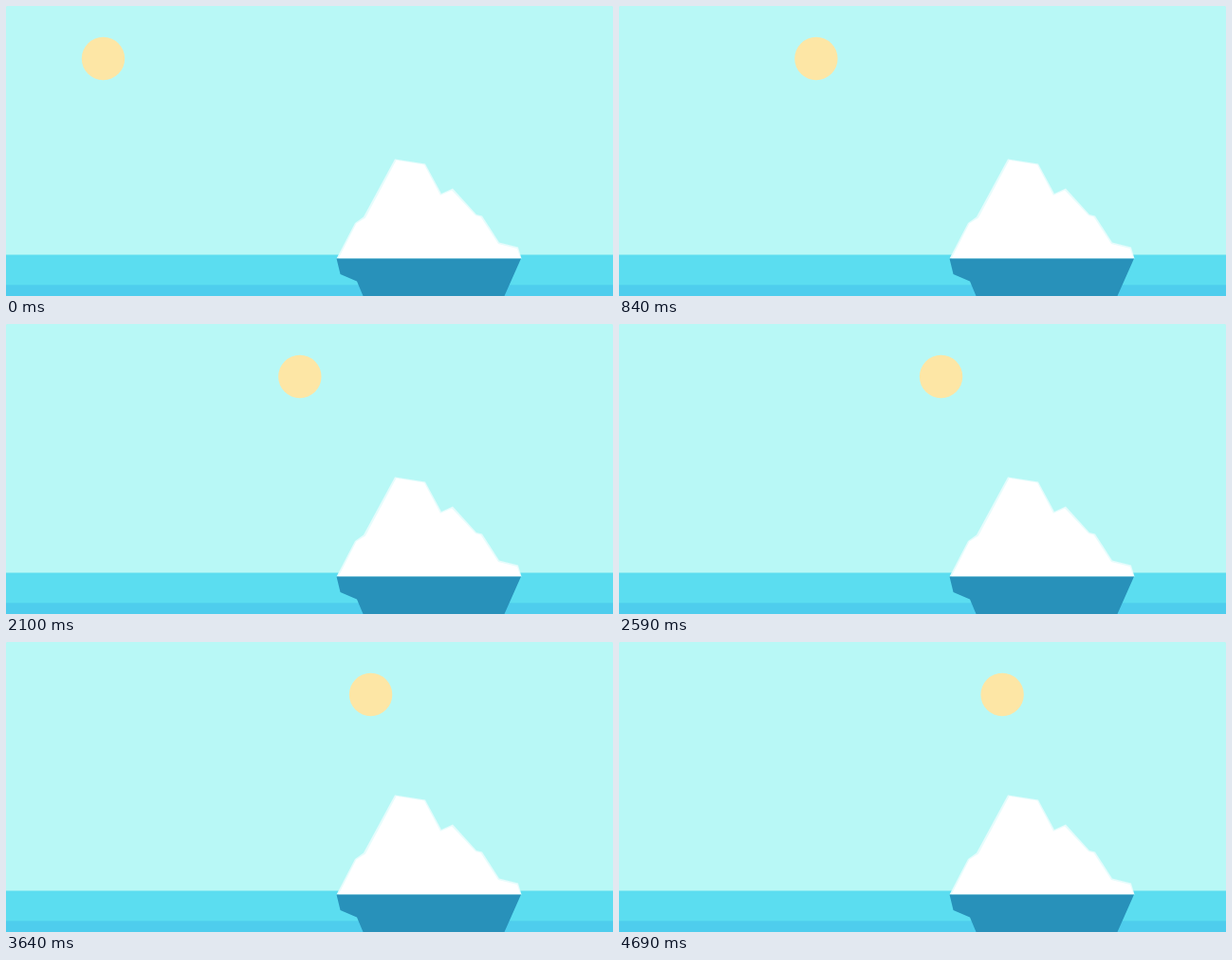
An HTML page that plays this animation: 640 by 306 pixels, repeating every 4.83 s.

```html
<!DOCTYPE html>
<html lang="en">
<head>
<meta charset="utf-8">
<title>Iceberg</title>
<style>
  html, body { margin: 0; width: 100%; height: 100%; overflow: hidden; background: #d5eeee; }
  svg { display: block; width: 100%; height: 100%; border-radius: 2px 2px 0 0; }
</style>
</head>
<body>
<svg viewBox="0 0 640 306">
  <rect width="640" height="306" fill="#b8f8f6"/>
  <circle id="sun" cx="102.5" cy="55.5" r="22.7" fill="#fde6a5"/>
  <rect y="262.5" width="640" height="44" fill="#5bddf0"/>
  <rect y="294.3" width="640" height="12" fill="#4ecded"/>
  <path d="M348.5 266.5 368 229 377 222.5 410 161.5 442 166.5 459 198 471 192.5 496 220 502 221.5 520 249.5 540 254.5 543.5 266.5Z" fill="#e6fcfc"/>
  <path d="M350.5 266.5 369.5 229.5 379 223.5 411.5 162.8 441 167.5 458 199.7 470 194.5 495 221 500.5 222.5 519 251 539 256 542.5 266.5Z" fill="#fff"/>
  <path d="M348.5 266.5H543L525.5 306H376.5L370 290.5 352.5 283Z" fill="#2891ba"/>
</svg>
<script>
  const sun = document.getElementById('sun');
  const LOOP = 4830, STEP = 70, LAST = 4690;
  const START = 102.5, END = 405, DURATION = 5115, LEAD = 146;

  // Quadratic ease-out; the sun rests at START for one step, then is already LEAD ms under way.
  function sunX(t) {
    if (t < STEP) return START;
    const left = 1 - (t + LEAD) / DURATION;
    return END - (END - START) * left * left;
  }

  const begin = performance.now();
  function draw(now) {
    const t = Math.max(0, now - begin) % LOOP;
    const held = Math.min(LAST, Math.floor(t / STEP) * STEP);
    sun.setAttribute('cx', sunX(held).toFixed(2));
    requestAnimationFrame(draw);
  }
  draw(begin);
</script>
</body>
</html>
```
